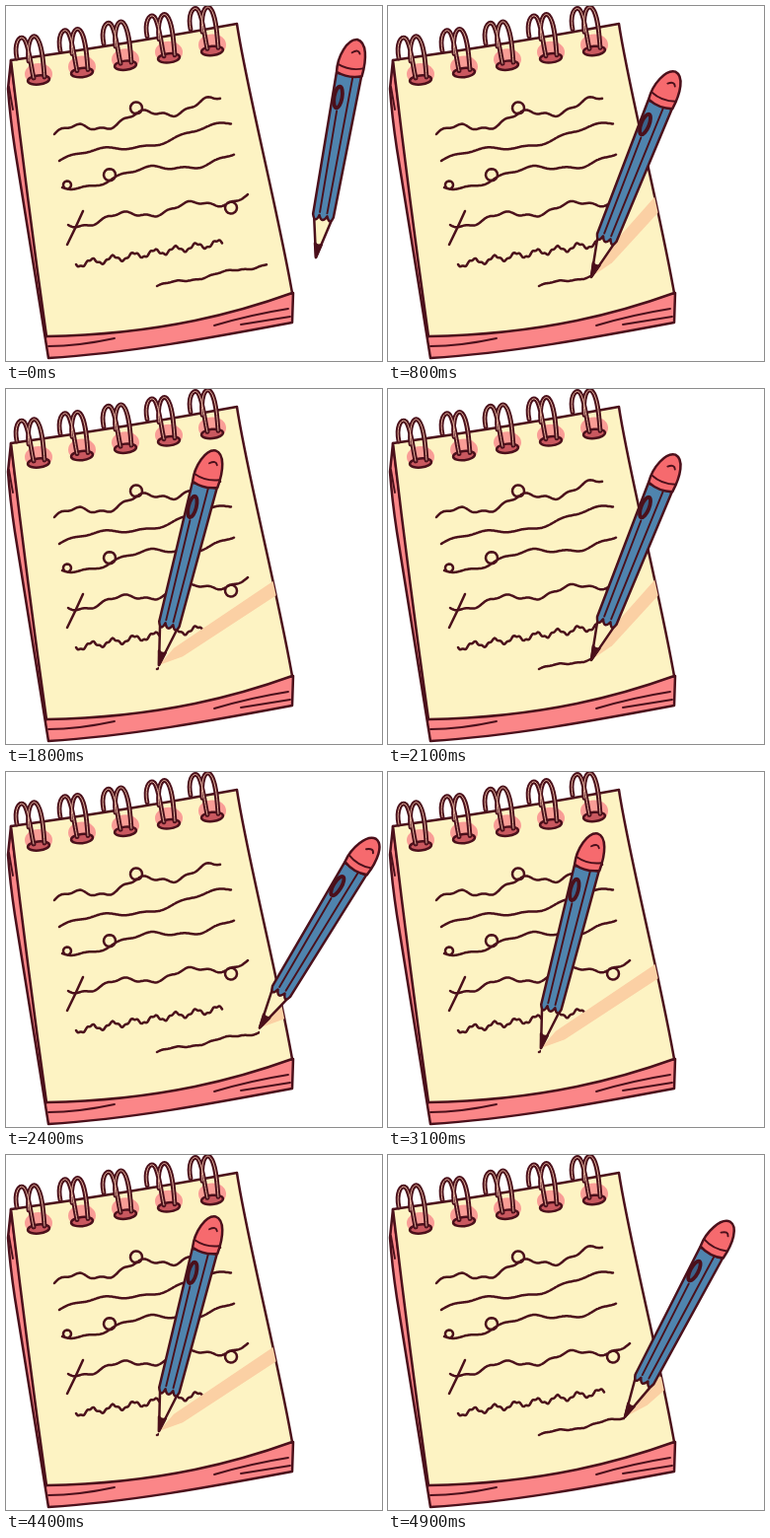
Write an HTML page that moves like this. It is 381 by 360 pixels and loops after 5 s.

```html
<!DOCTYPE html>
<html lang="en">
<head>
<meta charset="utf-8">
<title>Notepad and pencil</title>
<style>
  html, body { margin: 0; width: 100%; height: 100%; overflow: hidden; background: #fff; }
  svg { display: block; width: 381px; height: 360px; }
  .ink { fill: none; stroke: #4b101b; stroke-width: 2.5; stroke-linecap: round; stroke-linejoin: round; }
  .thin { stroke-width: 1.9; }
  .tube { stroke-width: 4.8; }
  .core { stroke: #e9b5a0; stroke-width: 1; }
  .pink { fill: #fb8688; }
  .paper { fill: #fdf3c3; }
  .dark { fill: #4b101b; }
  .blue { fill: #4f84ae; }
  .rubber { fill: #f66a6e; }
</style>
</head>
<body>
<svg viewBox="0 0 381 360">
  <defs>
    <path id="page" d="M5 55 Q120 39 234 18 C243 80 275 205 290 291 C240 309 160 333 41 335 Q22 200 5 55 Z"/>
    <clipPath id="pageClip"><use href="#page"/></clipPath>
    <clipPath id="written"><rect id="reveal" x="145" y="250" width="130" height="45"/></clipPath>
    <path id="coil" d="M-22 -22 C-25 -36 -20 -46 -15 -42 C-10 -37 -8 -15 -5 -2 M-10 -19 C-12 -38 -7 -48 -2 -43 C4 -36 5 -15 6 -3"/>
    <g id="ring">
      <ellipse fill="#f99d96" cx="0" cy="-6" rx="14" ry="11"/>
      <ellipse class="ink" cx="0" cy="0" rx="11" ry="4.6" transform="rotate(-6)" style="fill:#c9585f"/>
      <use href="#coil" class="ink tube"/>
      <use href="#coil" class="ink core"/>
    </g>
  </defs>

  <path class="ink pink" d="M5 55 L2 84 Q4 112 9 145 L43 357 C125 352 210 336 290 321 L291 291 L41 335 Z"/>
  <use href="#page" class="ink paper"/>
  <path class="ink thin" d="M3 82 L7 105 M211 324 Q248 313 286 307 M238 323 L288 315 M43 345 Q73 345 110 337"/>
  <g id="rings"></g>
  <g id="notes" class="ink"><path d="M78 208 Q70 226 62 242"/></g>
  <g id="lastNote" class="ink" clip-path="url(#written)"></g>

  <g clip-path="url(#pageClip)">
    <path id="shadow" fill="#fbd0a4" d="M0 0 L22 -6 L150 -7 L150 7 L25 6 Z"/>
  </g>

  <g id="pencil" class="ink">
    <path class="paper" d="M-10 -45 L0 0 L10 -44 Z"/>
    <path class="dark" d="M-3.5 -14 Q0 -11 3.5 -14 L0 0 Z"/>
    <path class="blue" d="M-12 -188 L-10.5 -43 Q-7 -33 -4 -43 Q0 -34 4 -43 Q8 -34 10.5 -43 L13.5 -188 Z"/>
    <path class="thin" d="M5 -187 L3.5 -46 M-5 -150 L-4 -46"/>
    <ellipse cx="-6" cy="-164" rx="4" ry="11" style="fill:#3b638b;stroke-width:3.8"/>
    <path class="rubber" d="M-12 -189 C-14 -205 -7 -224 3 -225 C13 -224 16 -207 14 -189 Q1 -184 -12 -189 Z"/>
    <path class="thin" d="M-12 -197 Q1 -192 14 -197 M0 -211 Q6 -216 8 -211"/>
  </g>
</svg>

<script>
  const $ = id => document.getElementById(id);
  const TAU = 2 * Math.PI;

  function add(parent, tag, attrs) {
    const el = document.createElementNS('http://www.w3.org/2000/svg', tag);
    for (const key in attrs) el.setAttribute(key, attrs[key]);
    parent.append(el);
  }

  // A wavy pen line; each loop is [x, radius], a negative radius hangs below
  function scribble(parent, [x0, y0], [x1, y1], amp, waves, loops = []) {
    const pts = [];
    const pending = [...loops];
    for (let x = x0; x <= x1; x++) {
      const t = (x - x0) / (x1 - x0);
      const a = TAU * waves * t;
      const y = y0 + (y1 - y0) * t - amp * (Math.sin(a) + 0.3 * Math.sin(3.3 * a));
      pts.push([x, y]);
      if (pending.length && x >= pending[0][0]) {
        const r = pending.shift()[1];
        for (let k = 0; k < TAU; k += 0.4) {
          pts.push([x + Math.abs(r) * Math.sin(k), y - r * (1 - Math.cos(k))]);
        }
      }
    }
    add(parent, 'path', { d: 'M' + pts.map(p => p.map(v => v.toFixed(1))).join('L') });
  }

  for (let i = 0; i < 5; i++) {
    add($('rings'), 'use', { href: '#ring', x: 33 + 44 * i, y: 75 - 7.4 * i });
  }

  const notes = $('notes');
  scribble(notes, [49, 130], [217, 96], 5, 2.4, [[132, 6]]);
  scribble(notes, [54, 157], [228, 121], 4, 1.4);
  scribble(notes, [57, 184], [231, 152], -4.5, 1.6, [[62, 4], [105, 6]]);
  scribble(notes, [63, 222], [245, 194], -4, 2.6, [[228, -6]]);
  scribble(notes, [71, 262], [219, 240], -3, 7);
  scribble($('lastNote'), [153, 284], [264, 262], 1.5, 2);

  const LOOP = 5000, CYCLE = 1300, HOLD = 500, STEP = 100, LAST = 6;
  const rest = { x: 314, y: 255, tilt: 10 };

  // Pencil tip and tilt while writing step i
  const writing = i => ({
    x: 155 + 17 * i,
    y: 280 - 0.57 * i * i,
    tilt: 14 + 2.2 * i + 0.1 * i * i
  });

  function lifted() {
    const end = writing(LAST);
    const mid = key => (end[key] + rest[key]) / 2;
    return { x: mid('x'), y: mid('y'), tilt: mid('tilt') };
  }

  function draw() {
    const phase = performance.now() % LOOP % CYCLE;
    const i = Math.floor((phase - HOLD) / STEP);
    const down = i >= 0 && i <= LAST;
    const { x, y, tilt } = i < 0 ? rest : down ? writing(i) : lifted();
    const cast = -48 + 1.6 * (i - 3) ** 2;

    $('pencil').setAttribute('transform', `translate(${x} ${y}) rotate(${tilt})`);
    $('shadow').setAttribute('transform', `translate(${x} ${y}) rotate(${cast})`);
    $('shadow').setAttribute('visibility', down ? 'visible' : 'hidden');
    $('reveal').setAttribute('width', down ? x - 145 : 130);
    requestAnimationFrame(draw);
  }
  draw();
</script>
</body>
</html>
```
